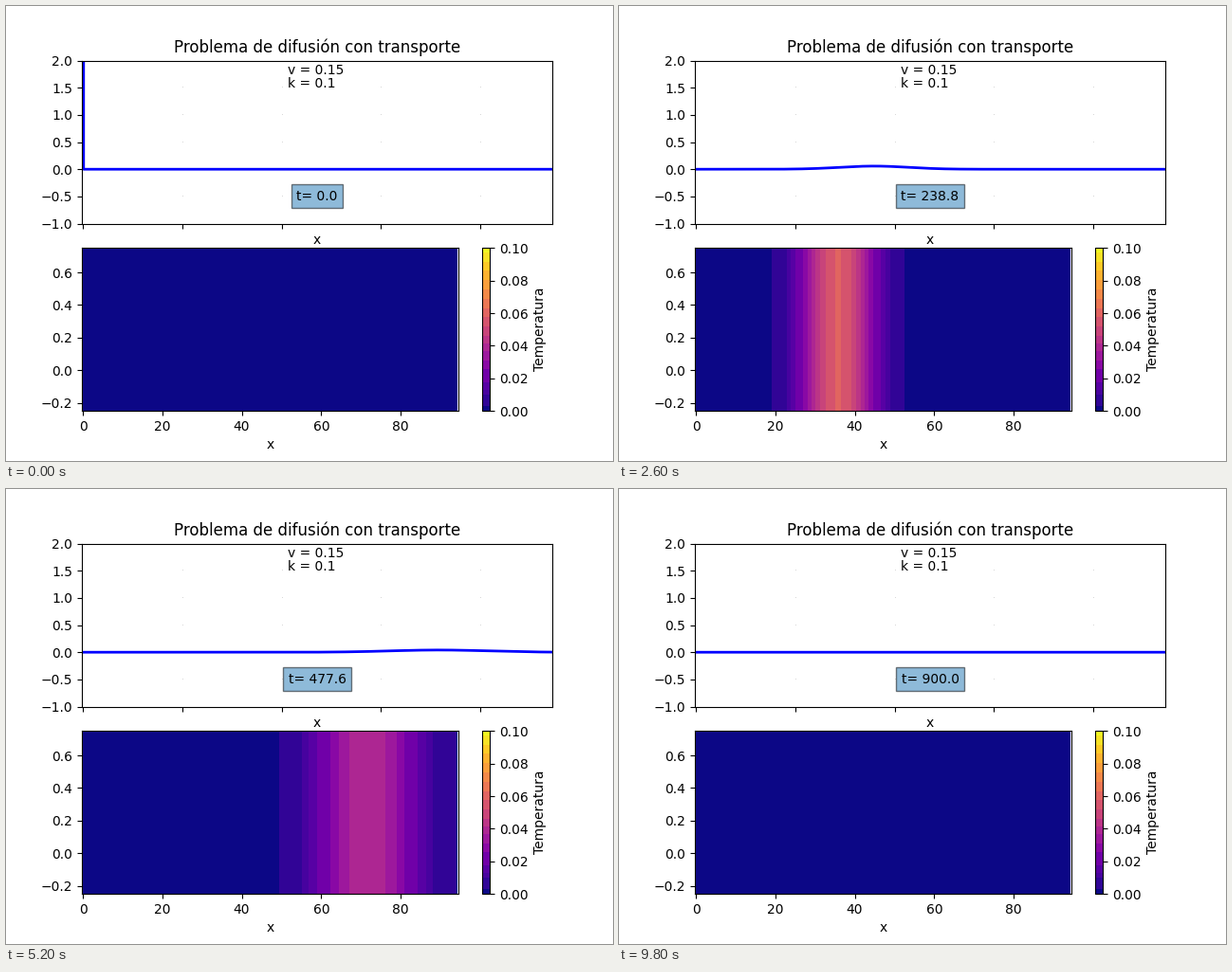
A matplotlib script for the animation above (10 s loop, 640 by 480 pixels).

```python
import numpy as np
import matplotlib.pyplot as plt
from matplotlib.animation import FuncAnimation
from matplotlib.colors import ListedColormap

V, K = 0.15, 0.1
L = 30 * np.pi
FRAMES = 50
TIMES = np.linspace(1e-5, 900, FRAMES)
VMAX = 0.1


def pulse(x, t):
    """Advected and diffused point source."""
    return np.exp(-(x - V * t) ** 2 / (4 * K * t)) / np.sqrt(4 * np.pi * K * t)


def banded_plasma(n=1000):
    """Plasma in flat steps, one colour per temperature band."""
    low = [0, 0.003, 0.0098, 0.013, 0.0177, 0.026, 0.0309, 0.0366, 0.0415, 0.0463]
    edges = np.array(low + list(np.arange(0.0518, VMAX, 0.0057)) + [VMAX])
    mids = (edges[:-1] + edges[1:]) / 2
    mids[0], mids[-1] = 0, VMAX
    values = (np.arange(n) + 0.5) / n * VMAX
    band = np.searchsorted(edges, values, side="right") - 1
    return ListedColormap(plt.get_cmap("plasma")(mids[band] / VMAX))


fig, (top, bottom) = plt.subplots(2, 1, sharex=True, figsize=(6.4, 4.8), dpi=100)
fig.subplots_adjust(left=0.125, right=0.9, bottom=0.11, top=0.88, hspace=0.15)

x = np.linspace(0, L, 1000)
cells = (np.arange(1000) + 0.5) * L / 1000

# Temperature curve
line, = top.plot(x, pulse(x, TIMES[0]), "b", lw=2)
gx, gy = np.meshgrid([20, 40, 60, 80], [-0.5, 0.5, 1, 1.5])
top.plot(gx.ravel(), gy.ravel(), ",", color="#d8d8d8", zorder=0.5)
top.set_ylim(-1, 2)
top.set_title("Problema de difusión con transporte")
top.set_xlabel("x")
top.text(0.437, 1.75, f"v = {V}", transform=top.get_yaxis_transform())
top.text(0.437, 1.5, f"k = {K}", transform=top.get_yaxis_transform())
clock = top.text(0.5, -0.5, "", ha="center", va="center",
                 transform=top.get_yaxis_transform(),
                 bbox=dict(facecolor="tab:blue", alpha=0.5))

# Temperature map
bar = bottom.imshow(pulse(cells, TIMES[0])[None, :], cmap=banded_plasma(),
                    vmin=0, vmax=VMAX, aspect="auto", interpolation="nearest",
                    extent=(0, L, -0.25, 0.75))
bottom.set_xlim(-0.25, 94.5)
bottom.set_ylim(-0.25, 0.75)
bottom.set_xlabel("x")
fig.colorbar(bar, ax=bottom, label="Temperatura")


def update(i):
    t = TIMES[i]
    line.set_ydata(pulse(x, t))
    bar.set_data(pulse(cells, t)[None, :])
    clock.set_text(f"t= {t:.1f}")
    return line, bar, clock


anim = FuncAnimation(fig, update, frames=FRAMES, interval=200, repeat=True)
plt.show()
```
